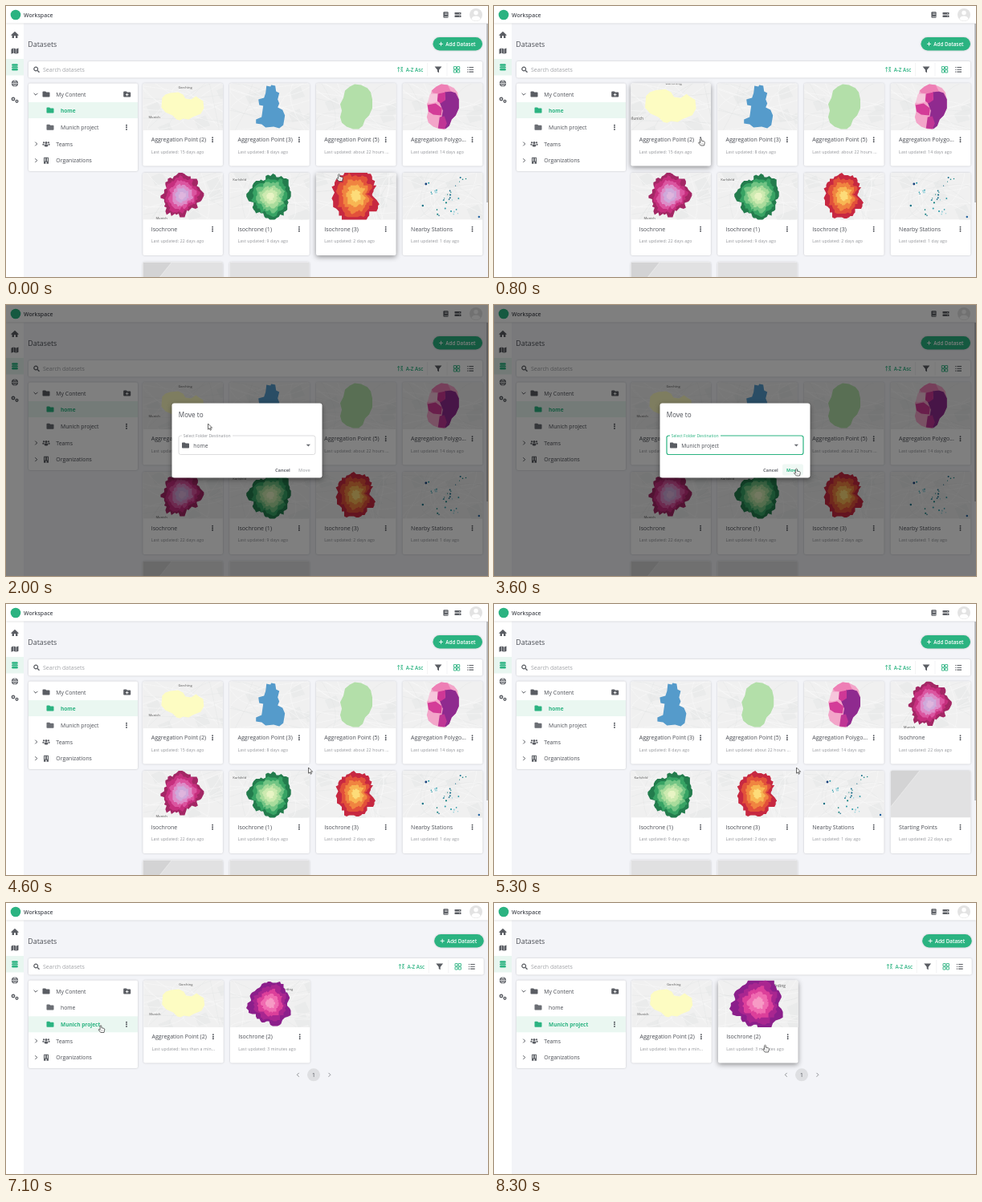
Animation of 600 by 338 pixels, one loop 8400 ms. Source, as an HTML page:

```html
<!DOCTYPE html>
<html lang="en">
<head>
<meta charset="utf-8">
<title>Datasets</title>
<style>
  html, body { margin: 0; width: 100%; height: 100%; overflow: hidden; background: #f3f4f8; }
  svg { display: block; width: 600px; height: 338px; font-family: "Open Sans", sans-serif; }
  .soft { filter: drop-shadow(0 .7px 1.2px rgba(0,0,0,.2)); }
  .lift { filter: drop-shadow(0 2px 3px rgba(0,0,0,.42)); }
</style>
</head>
<body>
<svg id="stage" viewBox="0 0 600 338"><defs id="thumbs"></defs><g id="scene"></g></svg>
<script>
const LOOP = 8400, TICK = 100;
const GREEN = '#2bb381', INK = '#4b4e55', GREY = '#8f9196';

// Drawing helpers
const rect = (x, y, w, h, fill, r = 0, extra = '') =>
  `<rect x="${x}" y="${y}" width="${w}" height="${h}" rx="${r}" fill="${fill}" ${extra}/>`;
const circle = (x, y, r, fill) => `<circle cx="${x}" cy="${y}" r="${r}" fill="${fill}"/>`;
const path = (d, fill, extra = '') => `<path d="${d}" fill="${fill}" ${extra}/>`;
const line = (d, color, w = 1) => path(d, 'none', `stroke="${color}" stroke-width="${w}"`);
const text = (x, y, s, size, fill = INK, weight = 400, extra = '') =>
  `<text x="${x}" y="${y}" font-size="${size}" fill="${fill}" font-weight="${weight}" ${extra}>${s}</text>`;
const at = (x, y, body) => `<g transform="translate(${x} ${y})">${body}</g>`;
const poly = (points, fill) => `<polygon points="${points}" fill="${fill}"/>`;
const paper = (x, y, w, h, r = 2, cls = 'soft') => rect(x, y, w, h, '#fff', r, `class="${cls}"`);

// Icons, each centred on its position
const icons = {
  home: c => path('M-4.8 .2L0-4.2 4.8 .2 4 1 3.4.5V4H1V1.2H-1V4H-3.4V.5L-4 1z', c),
  map: c => path('M-4.5-2.5L-1.8-3.6V2.6L-4.5 3.6zM-1.3-3.6L1.3-2.6V3.6L-1.3 2.6zM1.8-2.6L4.5-3.6V2.5L1.8 3.6z', c),
  data: c => [-2.9, 0, 2.9].map(y => rect(-3.8, y - 1.2, 7.6, 2.4, c, 1.2)).join(''),
  globe: c => circle(0, 0, 4.1, c) + line('M-4 0H4M0-4V4M0-4C-2.7-2-2.7 2 0 4C2.7 2 2.7-2 0-4', '#fff', .6),
  gears: c => [[-2, -.8, 2.2], [2.5, 2, 1.9]].map(([x, y, r]) =>
    `<circle cx="${x}" cy="${y}" r="${r * .75}" fill="none" stroke="${c}" stroke-width="${r * .7}"/>`).join(''),
  folder: c => path('M-4.5-2.7Q-4.5-3.6-3.6-3.6H-.9L.2-2.5H3.7Q4.5-2.5 4.5-1.6V2.7Q4.5 3.5 3.7 3.5H-3.7Q-4.5 3.5-4.5 2.7z', c),
  addFolder: c => icons.folder(c) + line('M0-1.2V2.4M-1.8.6H1.8', '#fff', .9),
  people: c => circle(0, -1.8, 1.5, c) + circle(-3, -2, 1.1, c) + circle(3, -2, 1.1, c) +
    rect(-2.4, .2, 4.8, 3, c, 1.4) + rect(-4.6, -.5, 2, 2, c, .8) + rect(2.6, -.5, 2, 2, c, .8),
  building: c => rect(-3, -4, 6, 8, c, .5) + line('M-1.4-3V1M1.4-3V1', '#fff', 1) + rect(-.7, 2, 1.4, 2, '#fff'),
  search: c => line('M1.3 1.3L3.5 3.5', c, 1.4) + `<circle cx="-.8" cy="-.8" r="2.4" fill="none" stroke="${c}" stroke-width="1.2"/>`,
  filter: c => path('M-4.4-3.8H4.4L1 .4V4L-1 2.7V.4z', c),
  sort: c => line('M-2-3V3M-3.4-1.4L-2-3L-.6-1.4M.7-2.8H3.2L.7-.4H3.2M.8 3L2 .6L3.2 3', c, .8),
  grid: c => [-3.7, .5].map(x => [-3.7, .5].map(y =>
    rect(x, y, 3.2, 3.2, 'none', .2, `stroke="${c}" stroke-width=".9"`)).join('')).join(''),
  list: c => line('M-3.8-2.8H-2.6M-3.8 0H-2.6M-3.8 2.8H-2.6M-1.6-2.8H4M-1.6 0H4M-1.6 2.8H4', c, 1.1),
  kebab: c => [-2.6, 0, 2.6].map(y => circle(0, y, .95, c)).join(''),
  book: c => rect(-3.1, -3.8, 6.2, 7.6, c, 1) + line('M-1.3-2H2M-1.3-.5H2M-2 2.4H3', '#fff', .6),
  tools: c => rect(-4, -3, 8, 2.6, c, .5) + rect(-4, .5, 8, 2.6, c, .5) + circle(2, -1.7, .5, '#fff') + circle(2, 1.8, .5, '#fff'),
  down: c => line('M-2.4-1.2L0 1.2L2.4-1.2', c, 1),
  right: c => line('M-1.2-2.4L1.2 0L-1.2 2.4', c, 1),
  left: c => line('M1.2-2.4L-1.2 0L1.2 2.4', c, 1),
  info: c => circle(0, 0, 3, c) + line('M0-.4V1.7M0-1.7V-.9', '#fff', .8),
  edit: c => path('M-3 3V1.3L1.2-2.8 2.8-1.2-1.3 3zM1.8-3.3L3.3-1.8 3.8-2.4 2.4-3.8z', c),
  download: c => path('M-.8-3H.8V-.5H2.3L0 1.6L-2.3-.5H-.8zM-3.2 1.3H-2V2.2H2V1.3H3.2V3.2H-3.2z', c),
  share: c => path('M.4-3L3.6-.3L.4 2.3V.8Q-2 .6-3 2.7Q-3.2-1.2.4-1.5z', c),
  trash: c => rect(-2.3, -2, 4.6, 5.2, c, .6) + rect(-3, -3.2, 6, .9, c) + line('M-.8-1V2M.8-1V2', '#fff', .5)
};
const icon = (name, x, y, color = '#5a5d63') => at(x, y, icons[name](color));

// Map thumbnails, 100 x 58.5
const MAP = '#f0f0f0';
function random(seed) {
  return () => (seed = (seed * 16807) % 2147483647) / 2147483647;
}
function mapBase(seed) {
  const rnd = random(seed * 7919);
  let out = rect(0, 0, 100, 58.5, MAP);
  for (let i = 0; i < 5; i++) {
    const x = rnd() * 100, y = rnd() * 58;
    out += poly([x, y, x + 14, y - 6, x + 20, y + 7, x + 5, y + 11], '#eaebeb');
  }
  for (let i = 0; i < 15; i++) {
    const y = rnd() * 58, x = rnd() * 100;
    out += line(i % 2 ? `M0 ${y}Q${x} ${rnd() * 58} 100 ${rnd() * 58}` : `M${x} 0Q${rnd() * 100} ${y} ${rnd() * 100} 58`,
      i % 3 ? '#f8f8f8' : '#e3e4e5', .5);
  }
  return out;
}
// Ragged nested areas; bite = [angle, depth, sharpness] dents the outline
function rings(cx, cy, rx, ry, seed, colors, [angle, depth, sharp] = [0, 0, 1]) {
  const rnd = random(seed * 104729);
  const snap = v => Math.round(v / 1.5) * 1.5;
  return colors.map((color, k) => {
    const scale = 1 - k / (colors.length + .15), points = [];
    for (let i = 0; i < 60; i++) {
      const a = i * Math.PI / 30;
      const dent = depth * Math.exp(sharp * (Math.cos(a - angle) - 1));
      const wave = 1 - dent + .06 * Math.sin(3 * a + seed) + .06 * Math.sin(8 * a + seed * 2 + k) + .16 * (rnd() - .5);
      points.push(cx + snap(rx * scale * wave * Math.cos(a)), cy + snap(ry * scale * wave * Math.sin(a)));
    }
    return poly(points, color);
  }).join('');
}
function stations() {
  const rnd = random(4242), colors = ['#12807f', '#2b9aa8', '#1a6f8c', '#9fd3dc'];
  let out = '';
  for (let i = 0; i < 34; i++) {
    const p = rnd(), spread = (rnd() - .5) * 24;
    const [x, y] = i % 2 ? [28 + p * 42, 16 + p * 28 + spread] : [74 - p * 34 + spread * .5, 6 + p * 48];
    out += circle(x, y, .6 + rnd() * .5, colors[i % 4]);
  }
  return out + circle(29, 14, 1.4, '#123e7a') + circle(95, 55, 1.2, '#1d5fa0') + circle(25, 41, 1.2, '#176f83');
}
const label = (x, y, s = 'Munich') => text(x, y, s, 4, '#777', 600);
const district = '36,9 42,4 48,1 56,2 64,6 68,11 70,20 70,31 66,40 61,45 58,53 53,57 46,57 38,54 32,49 30,42 32,34 30,26 34,18';

const art = {
  yellow: mapBase(3) + label(7, 43) + label(44, 6, 'Garching') + poly('24,18 28,14 34,12 44,11 50,14 53,19 60,20 66,16 70,19 75,22 76,31 72,38 62,42 57,45 50,44 46,46 42,45 37,40 28,36 23,30', '#fdfcc2'),
  blue: mapBase(5) + poly('46,3 51,4 52,2 57,3 58,10 62,12 60,20 62,25 60,30 66,33 69,40 67,52 62,56 55,54 45,55 40,51 33,50 33,45 40,42 42,28 37,27 36,20 43,18 45,12', '#559bcb'),
  green: mapBase(8) + poly(district, '#b3dfa9'),
  pink: mapBase(8) + poly(district, '#f3a5c9') +
    poly('52,9 60,10 66,12 70,20 70,31 66,40 61,45 58,53 53,57 48,45 50,34 46,24 53,20', '#8f2a8f') +
    poly('36,9 42,4 48,1 56,2 60,10 52,11 46,13 38,12', '#ee7fb5') +
    poly('44,13 53,11 53,21 47,25 43,22', '#cf3796') + poly('34,13 43,13 43,23 35,25 31,24', '#f6c6dc') +
    poly('31,27 41,25 49,31 48,40 38,39 32,35', '#d43c98') + poly('46,42 52,41 55,50 52,57 44,56', '#c03595'),
  magenta: mapBase(13) + rings(49, 28.5, 25, 26.5, 1, ['#a32765', '#c62f7e', '#db55a0', '#de8cc8', '#cfa9da', '#dfb5de'], [.8, .2, 4]) + label(16, 58),
  emerald: mapBase(17) + label(4, 10, 'Karlsfeld') + rings(51, 29.5, 25.5, 26.5, 4, ['#237c4d', '#37a364', '#72c484', '#a9dc9c', '#cdeab0', '#e8f4c4']),
  fire: mapBase(23) + rings(50, 28.5, 25, 27, 2, ['#c72841', '#e2513a', '#f08440', '#f8b653', '#fddc79'], [-.15, .42, 14]),
  dots: mapBase(29) + stations(),
  starting: rect(0, 0, 100, 58.5, '#e1e1e2') + poly('0,0 36,0 0,45', '#d3d3d4') + line('M36 0L0 45', '#eee', .7),
  plain: rect(0, 0, 100, 58.5, '#e0e0e1'),
  violet: mapBase(31) + label(66, 12, 'Erding') + rings(50, 28.5, 25.5, 26.5, 5, ['#8b1f8b', '#a92690', '#dc3f9a', '#f06bb1', '#f79ac5'])
};
document.getElementById('thumbs').innerHTML =
  '<clipPath id="frame"><path d="M0 58.5V2Q0 0 2 0H97.5Q99.5 0 99.5 2V58.5z"/></clipPath>' +
  Object.entries(art).map(([id, body]) => `<g id="${id}">${body}</g>`).join('');

// Content: [thumbnail, title, age]
const yellowCard = ['yellow', 'Aggregation Point (2)', '15 days ago'];
const others = [
  ['blue', 'Aggregation Point (3)', '8 days ago'], ['green', 'Aggregation Point (5)', 'about 22 hours ...'],
  ['pink', 'Aggregation Polygo...', '14 days ago'], ['magenta', 'Isochrone', '22 days ago'],
  ['emerald', 'Isochrone (1)', '9 days ago'], ['fire', 'Isochrone (3)', '2 days ago'],
  ['dots', 'Nearby Stations', '1 day ago'], ['starting', 'Starting Points', '22 days ago'],
  ['plain', '', ''], ['plain', '', '']
];
const projectCards = [['yellow', 'Aggregation Point (2)', 'less than a min...'], ['violet', 'Isochrone (2)', '3 minutes ago']];

const MENU = 1000, DIALOG = 1900, SELECT = 2600, CHOSEN = 3000, CLOSED = 4600, MOVED = 4900, OPENED = 6700;
const cursorKeys = [
  [0, 414.5, 209.5], [700, 257.5, 165], [1100, 257.5, 165], [1600, 251.5, 148], [2100, 251.5, 148],
  [2500, 290, 173], [2700, 290, 173], [2900, 278, 192], [3100, 278, 192], [3500, 376.5, 204],
  [5600, 376.5, 204], [6300, 118, 152.5], [7200, 118, 152.5], [8000, 337.5, 177], [LOOP, 337.5, 177]
];
function cursorAt(t) {
  const i = cursorKeys.findIndex(k => k[0] > t);
  const [t0, x0, y0] = cursorKeys[i - 1], [t1, x1, y1] = cursorKeys[i];
  const p = (t - t0) / (t1 - t0), e = p * p * (3 - 2 * p);
  return [x0 + (x1 - x0) * e, y0 + (y1 - y0) * e];
}
const inside = ([px, py], x, y, w, h) => px >= x && px < x + w && py >= y && py < y + h;

function card([thumb, title, age], x, y, hovered) {
  const zoom = hovered ? 'transform="translate(50 29.2) scale(1.2) translate(-50 -29.2)"' : '';
  return at(x, y, paper(0, 0, 99.5, 103, 2, hovered ? 'lift' : 'soft') +
    `<g clip-path="url(#frame)"><use href="#${thumb}" ${zoom}/></g>` +
    text(10.3, 72.6, title, 7.04) + icon('kebab', 86.7, 70.2, INK) +
    (age && text(10.3, 87.2, 'Last updated: ' + age, 5.15, GREY, 400, 'letter-spacing=".14"')));
}

function chrome(wide) {
  const s = wide ? 1.7 : 0;
  return rect(0, 0, 600, 338, '#f3f4f8') + rect(0, 21, 22, 317, '#fff') + rect(0, 66, 22, 20.5, '#e8f6f0') +
    rect(0, 0, 600, 21.5, '#fff', 0, 'class="soft"') + circle(12, 11, 6.3, GREEN) + text(22, 13.5, 'Workspace', 6.9, INK, 600) +
    icon('book', 547.5, 11) + icon('tools', 562.5, 11) + circle(585, 11, 8, '#e3e3e3') +
    circle(585, 8.5, 2.7, '#fff') + path('M579.5 16.5Q580 12.5 585 12.5T590.5 16.5Q588 18.5 585 18.5T579.5 16.5', '#fff') +
    ['home', 'map', 'data', 'globe', 'gears'].map((n, i) => icon(n, 11, 36 + i * 20.2, n === 'data' ? GREEN : '#5a5d63')).join('') +
    text(27.3, 50.7, 'Datasets', 8.85) +
    rect(531.5 + s, 39, 61.5, 16.5, GREEN, 8.3, 'class="soft"') + line(`M${539 + s} 47.3h5M${541.5 + s} 44.8v5`, '#fff', .9) +
    text(547.3 + s, 49.6, 'Add Dataset', 6.3, '#fff', 600) +
    paper(28, 69, 565 + s, 20.5) + icon('search', 38, 79.3) + text(46, 81.8, 'Search datasets', 7.05, '#a3a5a9') +
    line(`M${524.5 + s} 71v16.5M${549 + s} 71v16.5`, '#ededef', .6) +
    icon('sort', 490.7 + s, 79.3, GREEN) + text(497.7 + s, 81.5, 'A-Z Asc', 6.25, GREEN, 600) +
    icon('filter', 538 + s, 79.3) + icon('grid', 561 + s, 79.3, GREEN) + icon('list', 578 + s, 79.3) +
    (wide ? '' : rect(598.2, 22, 1.8, 223, '#b5b6b9'));
}

function folders(project, hover) {
  const row = (name, y, active) => (active ? rect(28, y - 10, 136, 20, '#eaf7f1') : '') +
    icon('folder', 55, y, active ? GREEN : '#6b6e74') +
    text(68, y + 2.5, name, active ? 6.55 : 6.8, active ? GREEN : INK, active ? 700 : 400);
  return paper(28, 96.5, 136, 109.5) + icon('down', 37, 110) + icon('folder', 50, 110) + text(62.3, 112.5, 'My Content', 6.9) +
    icon('addFolder', 150.7, 110) + (hover && !project ? rect(28, 141, 136, 20, '#f6f6f6') : '') +
    row('home', 130, !project) + row('Munich project', 151.3, project) + icon('kebab', 150, 151.3, INK) +
    icon('right', 37.5, 172) + icon('people', 50, 172.3) + text(62.3, 174.7, 'Teams', 6.9) +
    icon('right', 37.5, 192.7) + icon('building', 50, 192.7) + text(62.3, 195.2, 'Organizations', 6.9);
}

const menuItems = [['info', 'Info'], ['edit', 'Edit metadata'], ['folder', 'Move to folder'], ['download', 'Download'], ['share', 'Share'], ['trash', 'Delete']];
function menu([, py]) {
  return paper(174, 101.5, 93, 100.5, 2, 'lift') + menuItems.map(([name, caption], i) => {
    const y = 112.7 + i * 15.6, red = name === 'trash';
    return (Math.abs(py - y) < 7.8 ? rect(174, y - 7.8, 93, 15.6, '#f4f4f5') : '') +
      at(183.7, y, `<g transform="scale(${name === 'folder' ? .78 : 1})">${icons[name](red ? '#e33d3d' : INK)}</g>`) +
      text(193.6, y + 2.1, caption, 5.8, red ? '#e0565b' : '#777a80');
  }).join('');
}

function dialog(t) {
  const open = t >= SELECT && t < CHOSEN + 100, chosen = t >= CHOSEN, focus = t >= SELECT;
  const ready = chosen && !open;
  let out = rect(0, 0, 600, 338, '#000', 0, 'opacity=".5"') + paper(206.5, 122.5, 187, 93, 3, 'lift') +
    text(214.8, 140.3, 'Move to', 8.2) +
    rect(215, 163, 170, 23.5, 'none', 2.5, `stroke="${focus ? GREEN : '#c4c4c6'}" stroke-width="${focus ? 1.2 : .6}"`) +
    rect(219, 161, 63, 4, '#fff') + text(220.7, 164.7, 'Select Folder Destination', 5.1, focus ? GREEN : GREY) +
    icon('folder', 223.5, 175) + text(233.3, 177.5, chosen ? 'Munich project' : 'home', 6.7) +
    path('M373.7 173.8H379L376.3 176.6z', '#6b6e74') +
    text(335, 207.6, 'Cancel', 5.7, '#696c72', 700) +
    (ready && t >= 3500 ? rect(359, 198.5, 26, 14, '#eff8f4', 2) : '') +
    text(364, 207.6, 'Move', 5.5, ready ? GREEN : '#bdbfc2', 700);
  if (open) {
    out += paper(215, 160.5, 170, 49, 2, 'lift') + rect(215, chosen ? 185 : 165, 170, 20, '#eaf7f1') +
      ['home', 'Munich project'].map((name, i) =>
        icon('folder', 223.5, 175 + i * 20) + text(233.3, 177.5 + i * 20, name, 6.7)).join('');
  }
  return `<g opacity="${t < DIALOG + 100 ? .5 : 1}">${out}</g>`;
}

function pointer([x, y], hand) {
  const outline = 'stroke="#444" stroke-width=".8" stroke-linejoin="round"';
  return at(x, y, hand
    ? path('M-.9.8Q0-.5.9.8V3.2L4 3.9Q5 4.3 4.8 5.5L4 9H-.2L-3 5.6Q-2.7 4.5-.9 5.7z', '#fff', outline) + line('M.5 5.5V7.5M2.2 5.5V7.5', '#777', .4)
    : path('M0 0V7.2L1.7 5.7L2.8 8.2L4 7.6L2.9 5.2H5.1z', '#fff', outline));
}

function scene(t) {
  const mouse = cursorAt(t), project = t >= OPENED;
  const hasMenu = t >= MENU && t < DIALOG, hasDialog = t >= DIALOG && t < CLOSED;
  const cards = project ? projectCards : t >= MOVED ? others : [yellowCard, ...others.slice(0, 9)];
  const overRow = inside(mouse, 28, 141, 136, 20);
  let hand = hasMenu || overRow;

  let out = chrome(project) + folders(project, overRow);
  cards.forEach((c, i) => {
    const x = (project ? 171.2 : 170.4) + (i % 4) * 107.8, y = 96.5 + Math.floor(i / 4) * 111.5;
    const hovered = !hasMenu && !hasDialog && inside(mouse, x, y, 99.5, 103);
    hand = hand || hovered;
    out += card(c, x, y, hovered);
  });
  if (project) {
    out += circle(383, 214.3, 8, '#dedfe2') + text(383, 216.8, '1', 6.8, INK, 400, 'text-anchor="middle"') +
      icon('left', 363.5, 214.3, GREY) + icon('right', 402.7, 214.3, GREY);
  }
  if (hasMenu) out += menu(mouse);
  if (hasDialog) {
    out += dialog(t);
    hand = inside(mouse, 215, 163, 170, 24) || inside(mouse, 359, 198, 26, 15) || (t >= SELECT && t <= CHOSEN);
  }
  return out + pointer(mouse, hand);
}

const layer = document.getElementById('scene');
let shown = -1;
function frame() {
  const t = Math.floor(performance.now() % LOOP / TICK) * TICK;
  if (t !== shown) layer.innerHTML = scene(shown = t);
  requestAnimationFrame(frame);
}
frame();
</script>
</body>
</html>
```
